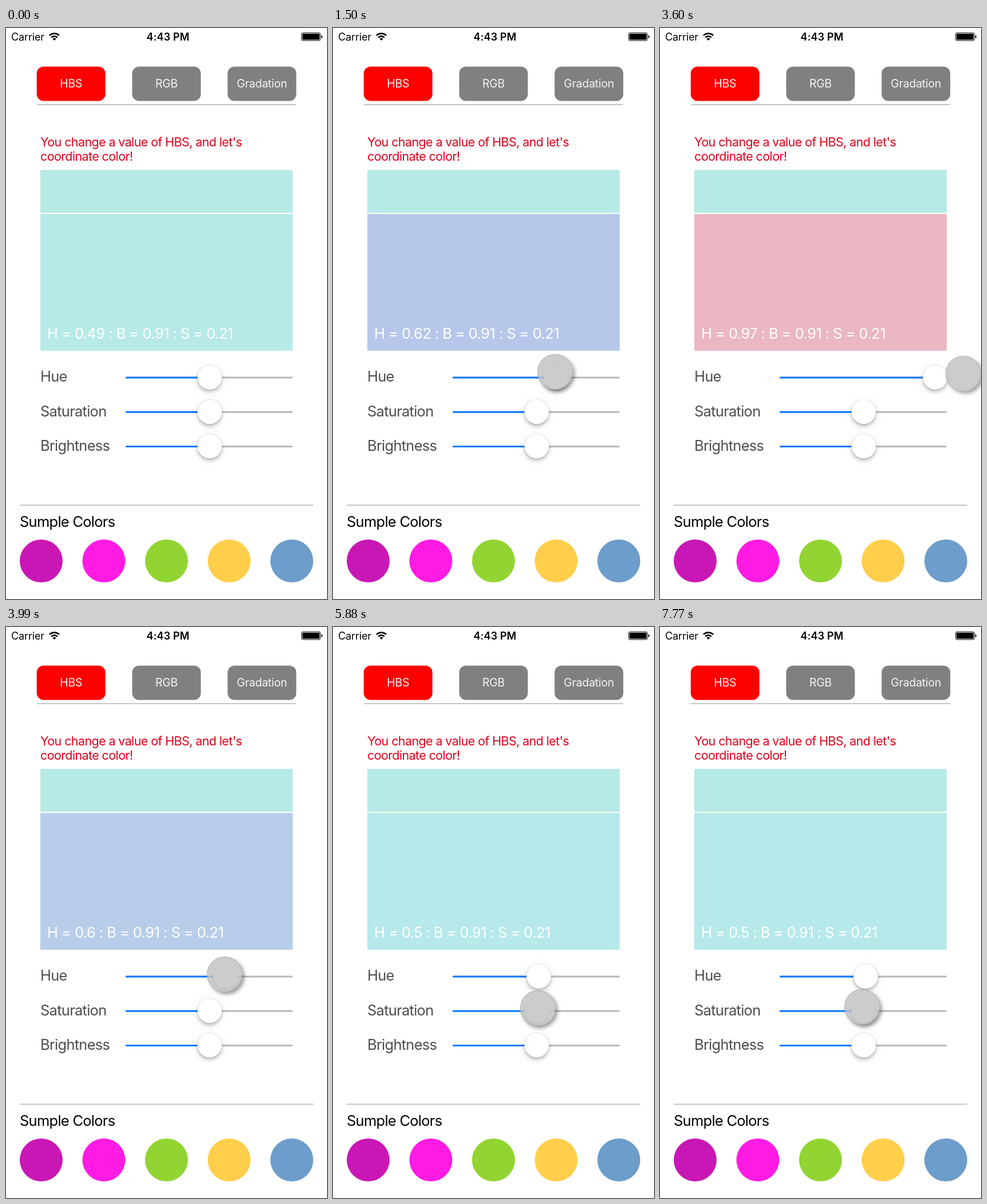
An HTML page for the animation above (8000 ms loop, 561 by 998 pixels).

```html
<!DOCTYPE html>
<html lang="en">
<head>
<meta charset="utf-8">
<title>Color sliders</title>
<style>
  html, body { margin: 0; width: 100%; height: 100%; overflow: hidden; background: #fff; }
  svg, .thumb, #cursor { position: absolute; left: 0; top: 0; }
  text { font-family: Inter, Roboto, sans-serif; white-space: pre; }
  .big { font-size: 25.5px; letter-spacing: -.029em; }
  .note { font-size: 21.5px; letter-spacing: -.0285em; fill: #e0001b; }
  .tab { font-size: 19.5px; letter-spacing: -.012em; fill: #f4f4f4; text-anchor: middle; }
  .status { font-size: 18px; letter-spacing: -.008em; }
  .clock { letter-spacing: .008em; font-weight: 600; text-anchor: middle; }
  #label { letter-spacing: -.022em; fill: #fff; }
  .thumb {
    width: 43px; height: 43px; margin: -21.5px; border-radius: 50%; background: #fff;
    box-shadow: 0 0 1px rgba(0,0,0,.3), 0 1px 1px rgba(0,0,0,.14),
      0 4px 6px rgba(0,0,0,.22), 0 2px 22px rgba(0,0,0,.05);
  }
  #cursor {
    box-sizing: border-box; width: 62px; height: 62px; margin: -31px; border-radius: 50%;
    background: rgba(192,195,194,.82); border: 1.5px solid rgba(160,160,160,.6);
    box-shadow: 4px 4px 6px rgba(0,0,0,.36);
  }
</style>
</head>
<body>
<svg id="stage" width="561" height="998" viewBox="0 0 561 998">
  <text class="status" x="9" y="22">Carrier</text>
  <text class="status clock" x="283" y="22">4:43 PM</text>
  <g fill="none" stroke="#000" stroke-width="2.6">
    <path d="M76 13.2a11.8 11.8 0 0 1 17 0M79.2 16.6a7.4 7.4 0 0 1 10.6 0"/>
    <path d="M84.5 22l-3-3.1a4.3 4.3 0 0 1 6 0z" fill="#000" stroke="none"/>
  </g>
  <rect x="516.5" y="8.5" width="33" height="13.5" rx="2.5" fill="none" stroke="#000"/>
  <rect x="518" y="10" width="30" height="10.5" rx="1"/>
  <path d="M551 12.5q2 .6 2 2.7t-2 2.7z"/>
  <path d="M54 134H507M24 834H537" stroke="#b4b4b4" stroke-width="1.6"/>
  <text class="note" x="60" y="207">You change a value of HBS, and let's</text>
  <text class="note" x="60" y="231.5">coordinate color!</text>
  <rect x="60" y="248" width="441" height="75" fill="#b7eae6"/>
  <rect id="panel" x="60" y="325" width="441" height="239"/>
  <text id="label" class="big" x="72" y="543"></text>
  <text class="big" x="24" y="872">Sumple Colors</text>
</svg>
<div id="cursor"></div>
<script>
const $ = id => document.getElementById(id);
const add = html => $('stage').insertAdjacentHTML('beforeend', html);
const clamp = (v, lo, hi) => Math.min(hi, Math.max(lo, v));
const round = v => Math.round(v * 100) / 100;

['HBS', 'RGB', 'Gradation'].forEach((name, i) => {
  const x = 53.7 + 166.8 * i;
  add(`<rect x="${x}" y="67.5" width="120" height="60" rx="12" fill="${i ? '#808080' : '#fd0000'}"/>
       <text class="tab" x="${x + 60}" y="104">${name}</text>`);
});

['#c817b5', '#ff1be3', '#92d432', '#ffce4a', '#6c9dcb'].forEach((fill, i) =>
  add(`<circle cx="${61.5 + 109.5 * i}" cy="931.5" r="37.5" fill="${fill}"/>`));

const MID = 355.5, END = 480.5;   // thumb centre at the middle and right end of a track

const sliders = ['Hue', 'Saturation', 'Brightness'].map((name, i) => {
  const y = 611 + 60.2 * i;
  add(`<text class="big" x="60" y="${y + 7.3}" fill="#4d4d4d">${name}</text>
       <g stroke-width="3" stroke-linecap="round"><path d="M210.5 ${y}H499.5" stroke="#b7b7b7"/>
       <path stroke="#067bfd"/></g>`);
  const fill = $('stage').lastElementChild.lastElementChild;
  const thumb = document.createElement('div');
  thumb.className = 'thumb';
  $('cursor').before(thumb);
  return x => {
    fill.setAttribute('d', `M210.5 ${y}H${x}`);
    thumb.style.transform = `translate(${x}px,${y - 0.8}px)`;
  };
});

// Pointer moves: start, end, target x, target y; it rests in between.
const moves = [
  [270, 840, 350, 600],
  [1350, 1500, 388, 601], [1500, 2070, 415, 602], [2370, 2760, 459, 603],
  [3060, 3390, 530, 604], [3660, 3990, 382, 607], [3990, 4170, 354, 606],
  [4710, 4860, 352, 620], [5040, 5670, 358, 666],
  [5880, 6480, 528, 667], [6720, 6930, 419.5, 684], [6930, 7200, 480, 664],
  [7350, 7770, 353, 664]
];

function pointer(t) {
  let x = 469, y = 693;
  for (const [start, end, toX, toY] of moves) {
    const p = clamp((t - start) / (end - start), 0, 1);
    x += (toX - x) * p;
    y += (toY - y) * p;
  }
  return [x, y];
}

// A grabbed thumb follows the pointer from where it was picked up.
const drag = (t, grabX, gain) => clamp(MID + (pointer(t)[0] - grabX) * gain, MID, END);

function hsv(h, s, v) {
  const channel = n => {
    const k = (n + h * 6) % 6;
    return Math.round(v * (1 - s * clamp(Math.min(k, 4 - k), 0, 1)));
  };
  return `rgb(${[5, 3, 1].map(channel)})`;
}

function draw(now) {
  const t = Math.floor(now % 8000 / 30) * 30;
  const released = t > 6720 && t < 7350;
  const hueX = drag(clamp(t, 1350, 4170), 350, .88);
  const satX = drag(released ? 6720 : Math.max(t, 5880), 358, 1.03);
  const hue = .4885 + (hueX - MID) / 262;
  const sat = .21 + .22 * (satX - MID) / (END - MID);
  [hueX, satX, MID].forEach((x, i) => sliders[i](x));
  $('panel').setAttribute('fill', hsv(hue, sat + .006, 234));
  $('label').textContent = `H = ${round(hue)} : B = 0.91 : S = ${round(sat)}`;
  const [x, y] = pointer(t);
  $('cursor').style.visibility = t < 270 ? 'hidden' : 'visible';
  $('cursor').style.transform = `translate(${x}px,${y}px)`;
  requestAnimationFrame(draw);
}
draw(performance.now());
</script>
</body>
</html>
```
